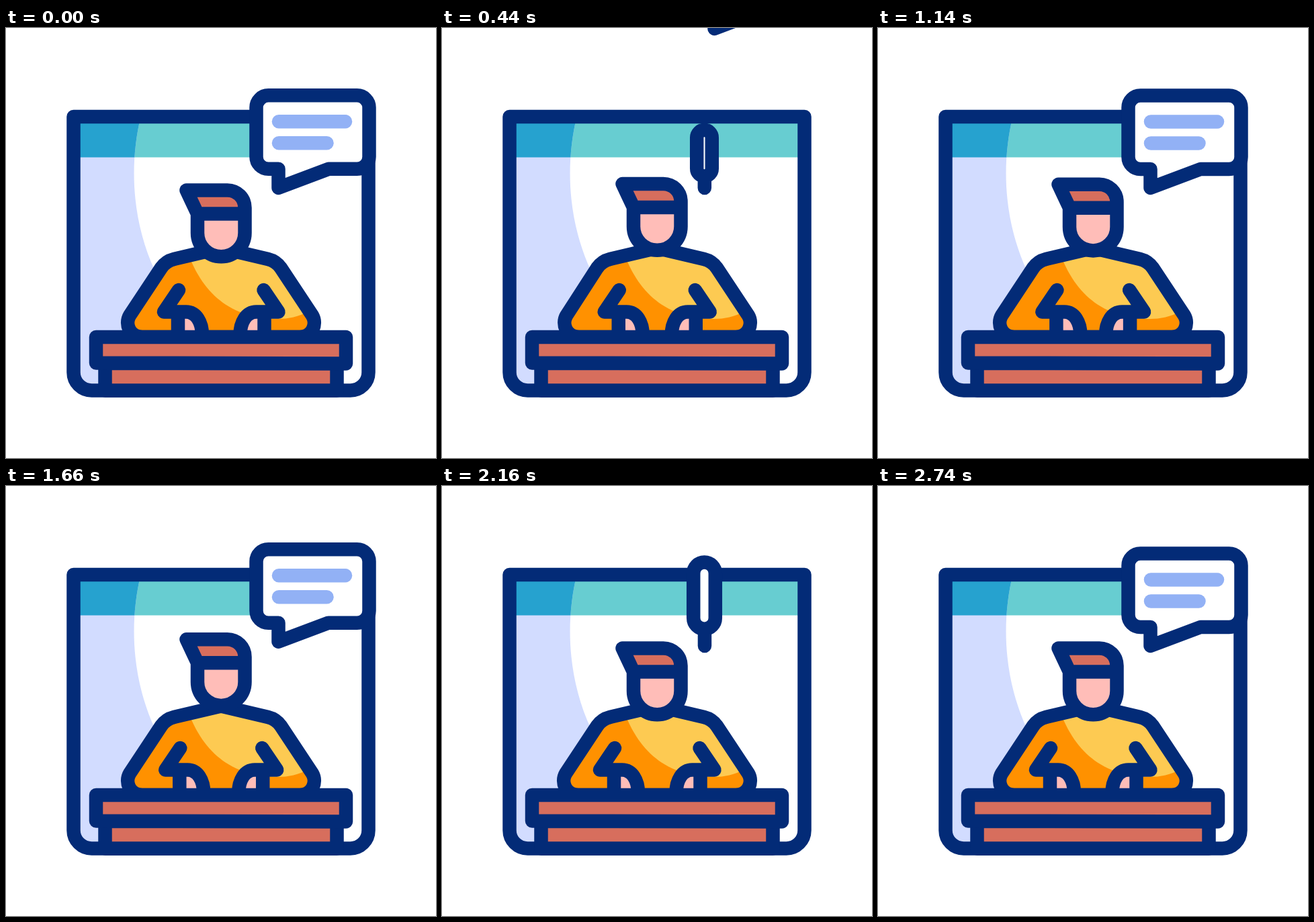
Animation, 640 px wide and 640 px high, one loop 3200 ms. Source, as an HTML page:

```html
<!DOCTYPE html>
<html lang="en">
<head>
<meta charset="utf-8">
<title>Speaker at a desk</title>
<style>
  html, body { margin: 0; width: 100%; height: 100%; overflow: hidden; background: #fff; }
  svg { display: block; width: 100%; height: 100%; }
  .ink { stroke: #032b77; stroke-width: 20.5; stroke-linecap: round; stroke-linejoin: round; }
  .text { stroke: #92b1f5; stroke-width: 20.5; stroke-linecap: round; }
</style>
</head>
<body>
<svg viewBox="0 0 640 640" fill="none">
  <defs>
    <clipPath id="shade"><path d="M100 132H200.5C184 200 186 285 222 362L240 400V540H100Z"/></clipPath>
    <clipPath id="torsoClip"><path class="torso"/></clipPath>
    <path id="window" d="M100.5 132H539.5V512.5A27 27 0 0 1 512.5 539.5H127.5A27 27 0 0 1 100.5 512.5Z"/>
    <g id="arm">
      <path fill="#ffbdb8" d="M256 422H268C283 422 292 438 292 458H256Z"/>
      <path class="ink" d="M257 390L235 422.5H268C283 422.5 292 438 292 457M256 422.5V457"/>
    </g>
  </defs>

  <use href="#window" fill="#fff"/>
  <path fill="#67cdd1" d="M100 132H540V192.5H100Z"/>
  <g clip-path="url(#shade)">
    <use href="#window" fill="#d2dcff"/>
    <path fill="#26a2cf" d="M100 132H540V192.5H100Z"/>
  </g>
  <use href="#window" class="ink"/>

  <path class="torso" fill="#ff9100"/>
  <path clip-path="url(#torsoClip)" fill="#fdca52"
        d="M266 320C287 392 332 433 405 433C420 433 435 430 452 421V320Z"/>
  <path class="torso ink"/>
  <use id="armL" href="#arm"/>
  <use id="armR" href="#arm"/>

  <g id="head">
    <path fill="#ffbdb8" d="M285 276H355.5V305A35.2 35.2 0 0 1 285 305Z"/>
    <path fill="#d76e5d" d="M268.5 241.5H329.5A26 26 0 0 1 355.5 267.5V276.5H285Z"/>
    <path class="ink" d="M268.5 241.5H329.5A26 26 0 0 1 355.5 267.5V305A35.2 35.2 0 0 1 285 305V276.5ZM285 276.5H355.5"/>
  </g>

  <path class="ink" fill="#d76e5d" d="M147.5 499H492.5V539.5H147.5Z"/>
  <path class="ink" fill="#d76e5d" d="M134 460H506V499.5L134 498.5Z"/>

  <g id="fresh">
    <path class="ink bubble" fill="#fff"/>
    <path class="text"/>
    <path class="text"/>
  </g>
  <g id="leaving">
    <path class="ink bubble" fill="#fff"/>
    <path class="text" d="M406 139.5H505"/>
    <path class="text" d="M406 171.5H477.5"/>
  </g>
</svg>
<script>
  const LOOP = 3200, SECOND = 1615;
  const $ = id => document.getElementById(id);
  const lerp = (a, b, k) => a + (b - a) * k;
  const part = (t, from, to) => Math.min(1, Math.max(0, (t - from) / (to - from)));
  const smooth = x => x * x * (3 - 2 * x);

  // Progress of a cubic Bezier easing at x
  function bezier(x1, y1, x2, y2, x) {
    const at = (a, b, s) => 3 * (1 - s) * (1 - s) * s * a + 3 * (1 - s) * s * s * b + s * s * s;
    let lo = 0, hi = 1;
    for (let i = 0; i < 24; i++) {
      const mid = (lo + hi) / 2;
      if (at(x1, x2, mid) < x) lo = mid; else hi = mid;
    }
    return at(y1, y2, (lo + hi) / 2);
  }

  // Value at t along [time, value] keys, eased between neighbours
  function track(t, keys) {
    for (let i = 1; i < keys.length; i++) {
      const [t0, v0] = keys[i - 1], [t1, v1] = keys[i];
      if (t <= t1) return lerp(v0, v1, smooth(part(t, t0, t1)));
    }
    return keys[keys.length - 1][1];
  }

  // Bubble outline: size scales it from the tail tip, width opens it to the right
  function bubblePath(size, width) {
    const X = x => (390.5 + (x - 390.5) * size).toFixed(2);
    const Y = y => (238 + (y - 238) * size).toFixed(2);
    const r = 18 * size, right = lerp(408.5, 540.5, width);
    const tail = lerp(391, 405.5, width), join = lerp(391, 480, width);
    const arc = (x, y) => `A${r} ${r} 0 0 1 ${X(x)} ${Y(y)}`;
    return `M${X(390.5)} ${Y(100.5)}H${X(right - 18)}${arc(right, 118.5)}V${Y(192)}` +
      `${arc(right - 18, 210)}H${X(join)}L${X(tail)} ${Y(238)}V${Y(210)}H${X(390.5)}` +
      `${arc(372.5, 192)}V${Y(118.5)}${arc(390.5, 100.5)}Z`;
  }

  const torsoPath = d => `M320 327.5L250 344Q238 347 231 357L${184 + d} 428` +
    `C${177 + d} 440 ${183 + d} 460 ${203 + d} 460H437C457 460 463 440 456 428L409 357Q402 347 390 344Z`;

  const fresh = $('fresh'), leaving = $('leaving');
  const [shape, line1, line2] = fresh.children;
  const torsos = document.querySelectorAll('.torso');
  leaving.children[0].setAttribute('d', bubblePath(1, 1));

  function setLine(el, y, length, k) {
    el.style.display = k > 0 ? '' : 'none';
    el.setAttribute('d', `M406 ${y}h${Math.max(0.01, length * k)}`);
  }

  function drawBubbles(c) {
    const out = bezier(0.29, 0, 0.833, 0.833, part(c, 0, 480));
    leaving.style.display = c < 480 ? '' : 'none';
    leaving.setAttribute('transform', `translate(0 ${-258 * out})`);

    const size = bezier(0.333, 0.333, 0.667, 1, part(c, 258, 633));
    fresh.style.display = c > 258 ? '' : 'none';
    shape.setAttribute('d', bubblePath(size, smooth(part(c, 640, 893))));
    setLine(line1, 139.5, 99, smooth(part(c, 850, 1030)));
    setLine(line2, 171.5, 71.5, smooth(part(c, 930, 1125)));
  }

  function drawPerson(t) {
    const lift = track(t, [[0, 0], [380, 10], [740, 3.5], [1560, 14.5], [2140, 0]]);
    const reach = track(t, [[0, 0], [800, 11.7], [2000, 0]]);
    const lean = track(t, [[0, 0], [800, 2], [1100, 0]]);
    $('head').setAttribute('transform', `translate(0 ${-lift})`);
    $('armL').setAttribute('transform', `translate(${reach} 0)`);
    $('armR').setAttribute('transform', `translate(${640.5 - reach} 0) scale(-1 1)`);
    torsos.forEach(el => el.setAttribute('d', torsoPath(lean)));
  }

  function frame() {
    const t = performance.now() % LOOP;
    drawBubbles(t < SECOND ? t + 5 : t - SECOND);
    drawPerson(t);
    requestAnimationFrame(frame);
  }
  frame();
</script>
</body>
</html>
```
